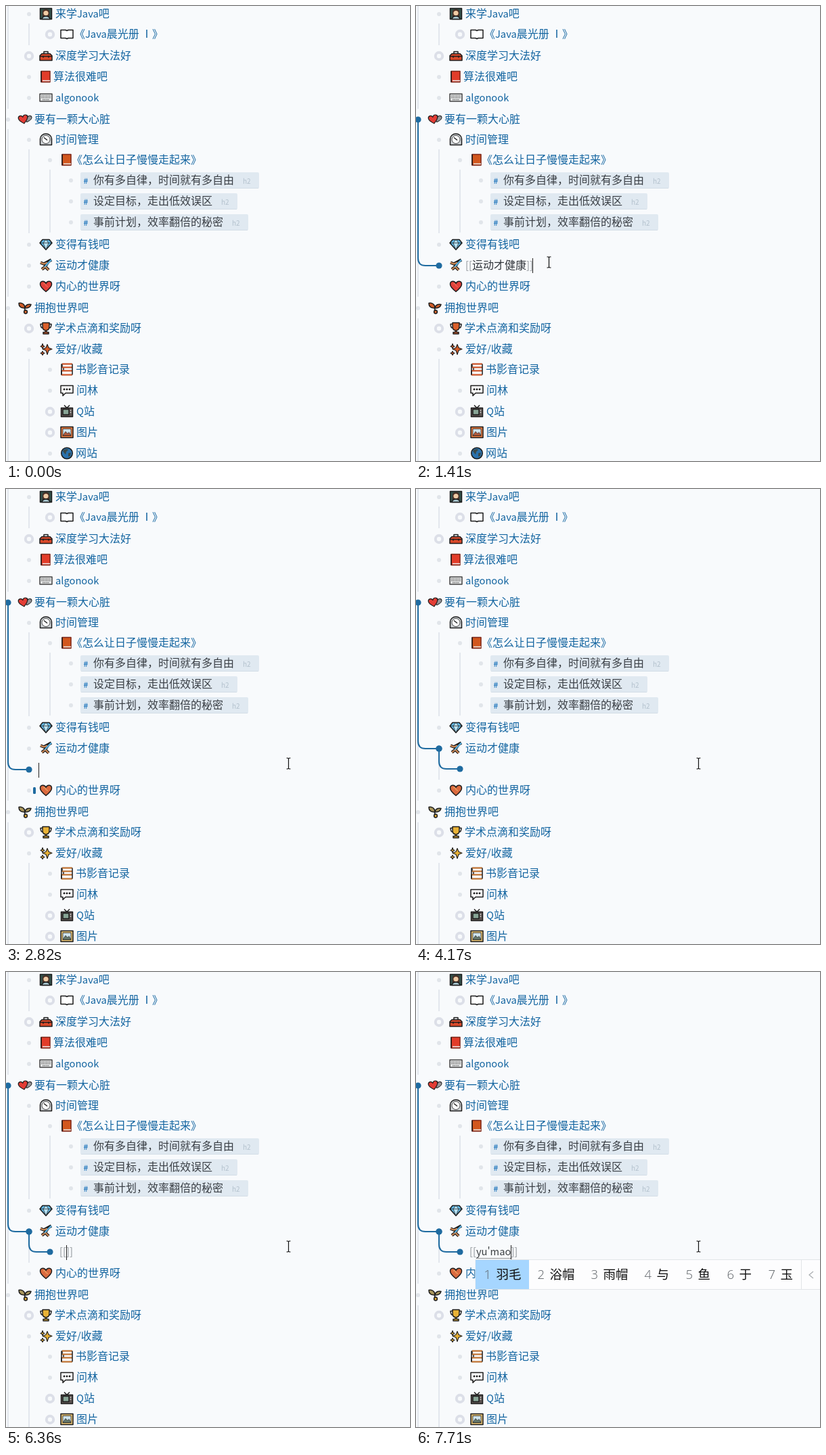
Write an HTML page that moves like this. It is 597x673 px and loops after 8 s.

```html
<!DOCTYPE html>
<html lang="zh-CN">
<head>
<meta charset="utf-8">
<title>Outline</title>
<style>
html, body { margin: 0; width: 100%; height: 100%; overflow: hidden; background: #f8fafc; }
svg { display: block; font-family: "Noto Sans CJK SC", "Noto Sans CJK", "Noto Sans CJK JP", sans-serif; font-weight: 350; }
text { white-space: pre; }
</style>
</head>
<body>
<svg id="stage" width="597" height="673" viewBox="0 0 597 673"></svg>
<script>
const LOOP = 8000, LINK = '#1264a0', BLUE = '#1f6ba0', PALE = '#e3e7ed', BG = '#f8fafc', FAINT = '#8c9196';
const LATIN = 14.7; // Latin letters sit slightly smaller beside 16 px Chinese
const FONT = '"Noto Sans CJK SC", "Noto Sans CJK", "Noto Sans CJK JP", sans-serif';
const stage = document.getElementById('stage');
const pen = document.createElement('canvas').getContext('2d');

// y, level, icon, text, text shift, folded
const rows = [
  [11.5, 1, 'girl', '来学Java吧'],
  [41.5, 2, 'open', '《Java晨光册 Ⅰ》', -3, 1],
  [73.5, 1, 'kit', '深度学习大法好', 0, 1],
  [104.5, 1, 'red', '算法很难吧', -3],
  [135.5, 1, 'keys', 'algonook'],
  [167.5, 0, 'hearts', '要有一颗大心脏'],
  [197.5, 1, 'clock', '时间管理'],
  [227.5, 2, 'brown', '《怎么让日子慢慢走起来》', -7],
  [352.5, 1, 'gem', '变得有钱吧'],
  [383.5, 1, 'flip', '运动才健康'],
  [414.5, 1, 'heart', '内心的世界呀'],
  [446.5, 0, 'sprout', '拥抱世界吧'],
  [476.5, 1, 'cup', '学术点滴和奖励呀', -1, 1],
  [507.5, 1, 'spark', '爱好/收藏'],
  [537.5, 2, 'books', '书影音记录', -1],
  [568.5, 2, 'bubble', '问林'],
  [599.5, 2, 'tv', 'Q站', 0, 1],
  [630.5, 2, 'photo', '图片', 0, 1],
  [661.5, 2, 'globe', '网站', -1]
];
const heads = [[258, '你有多自律，时间就有多自由'], [289, '设定目标，走出低效误区'], [320, '事前计划，效率翻倍的秘密']];
const pages = ['New page: y', 'oldKey', 'angery', 'cherry', 'safetyPin', 'motorCycle'];

// time, before, composing, after, candidates
const typing = [
  [0, '', '', '', ''],
  [4900, '', 'y', '', '有 一 要 也 与 用 以'],
  [5300, '', '', '', ''],
  [6030, '[', '', '', ''],
  [6360, '[[', '', ']]', ''],
  [6910, '[[', 'y', ']]', '有 一 要 也 与 用 以'],
  [7180, '[[', 'yu', ']]', '与 鱼 于 玉 雨 语 余'],
  [7450, '[[', "yu'm", ']]', '羽毛 玉门 渔民 与 鱼 于 玉'],
  [7580, '[[', "yu'ma", ']]', '御马 驭马 遇马 与 鱼 于 玉'],
  [7710, '[[', "yu'mao", ']]', '羽毛 浴帽 雨帽 与 鱼 于 玉']
];
const blinkOff = [[1890, 2420], [3380, 3650], [4170, 4700], [5830, 6030]];

const HEART = 'M0 8C-5 4-8.5 1-8.5-3C-8.5-8-2-9 0-4C2-9 8.5-8 8.5-3C8.5 1 5 4 0 8Z';
const path = (d, fill = 'none', more = '') => `<path d="${d}" fill="${fill}" ${more}/>`;
const rect = (x, y, w, h, fill, more = '') => `<rect x="${x}" y="${y}" width="${w}" height="${h}" fill="${fill}" ${more}/>`;
const dot = (x, y, r, fill, more = '') => `<circle cx="${x}" cy="${y}" r="${r}" fill="${fill}" ${more}/>`;
const text = (x, mid, s, fill, size = 16, more = '') =>
  `<text x="${x}" y="${Math.floor(mid + size * .375)}" fill="${fill}" font-size="${size}" ${more}>${s}</text>`;
const latin = (s, fill) => `<tspan font-size="${LATIN}" fill="${fill}">${s}</tspan>`;
const mixed = (s, fill) => s.replace(/[ -~]+/g, part => latin(part, fill));
const width = (s, size = LATIN) => (pen.font = `350 ${size}px ${FONT}`, pen.measureText(s).width);
const within = (t, [a, b]) => t >= a && t < b;
const bulletX = level => 3 + 31 * level;

const book = c => path('M-7-8H6V8H-7Z', c, 'stroke="#7d2416"') + path('M-5 6H6', 'none', 'stroke="#eee"') + path('M-7-8V8');
const icons = {
  girl: () => rect(-8.5, -8, 17, 16, '#35504a') + path('M-5 4V-3C-5-8 5-8 5-3V4Z', '#4a3026', 'stroke="none"') +
    dot(0, -1, 3.6, '#f0cba4', 'stroke="none"') + path('M-6 8C-5 2 5 2 6 8Z', '#a9c6cf'),
  open: () => path('M-9-6H-2L0-5L2-6H9V6H2L0 7L-2 6H-9Z', '#fff'),
  kit: () => path('M-3-2V-6H3V-2') + path('M-9 7V0L-6-3H6L9 0V7Z', '#db4a2b') + path('M-9 1H9M-4 0V3M4 0V3'),
  red: () => book('#e23c2a'),
  brown: () => book('#d2581f'),
  keys: () => rect(-9, -5.5, 18, 11, '#e4e6e6', 'stroke="#444"') +
    path('M-7-2.5H7M-7 0H7M-5 3H5', 'none', 'stroke="#777" stroke-dasharray="1.6 .8"'),
  hearts: () => path(HEART, '#96969a', 'transform="translate(4 -1) rotate(12) scale(.66)"') +
    path(HEART, '#e33d35', 'transform="translate(-2.5 0) rotate(-12) scale(.8)"'),
  clock: () => path('M-8.5 8V-1A8.5 7.5 0 0 1 8.5-1V8Z', '#cfd3d6') + dot(0, 0, 6, '#fff', 'stroke-width=".8"') + path('M2 1L-3-3'),
  gem: () => path('M-5-7H5L9-2L0 8L-9-2Z', '#62b6e2') + path('M-9-2H9M-4-2L0 8L4-2L0-7Z', '#b9e2f4', 'stroke-width=".7"'),
  flip: () => path('M-8-4L-3-2L8-8M4-6L-2 3L-6 6M-1 2L4 7', 'none', 'stroke-width="4.5"') +
    path('M-8-4L-3-2L2-4', 'none', 'stroke="#d58d58" stroke-width="2"') + path('M8-8L1-1L-2 3', 'none', 'stroke="#58aede" stroke-width="2.4"') +
    path('M-2 3L-6 6M-1 2L4 7', 'none', 'stroke="#d58d58" stroke-width="2"'),
  heart: late => path(HEART, late ? '#db6a3e' : '#e2413a') + path('M-4-3C-3-5-1-4 0-1L3 1', 'none', late ? 'stroke="#e9a060"' : 'stroke="#ea6a55"'),
  sprout: late => path('M0 0C-1 3 0 4 1 5') + path('M0 0C-8 1-9-4-9-7C-4-8 0-5 0 0C1-5 5-6 9-5C8-1 4 1 0 0Z', late ? '#a9965c' : '#cf5c28') +
    dot(1, 6, 2.4, late ? '#e5ac38' : '#dd6a30'),
  cup: late => path('M-5-6H-8C-8-2-6 0-4 0M5-6H8C8-2 6 0 4 0') +
    path('M-5-8H5V-3C5 1 3 3 1 3V6H4V8.5H-4V6H-1V3C-3 3-5 1-5-3Z', warm(late)),
  spark: late => path('M2-7L4-2L9 0L4 2L2 8L0 2L-5 0L0-2ZM-5-8L-4-5L-2-4L-4-3L-5-1L-6-3L-8-4L-6-5ZM-5 3L-4 5L-2 6L-4 7L-5 9L-6 7L-8 6L-6 5Z', warm(late), 'stroke-width="1.1"'),
  books: late => path('M7-8H-7V-3H7M8-3H-5V2H8M7 2H-8V8H7', '#fff') + path('M8-8H-7M8-3H-7M8 2H-8M8 8H-8', 'none', `stroke="${late ? '#cf7a34' : '#dc5a2c'}" stroke-width="2.2"`) +
    path('M-8-8V8M8-8V8'),
  bubble: () => path('M-9-7H9V4H-2L-6 8V4H-9Z', '#fff') + [-4, 0, 4].map(x => dot(x, -1.5, .7, '#222')).join(''),
  tv: () => path('M-4-9L0-5L4-9') + rect(-8.5, -5, 17, 13, '#5d5452') + rect(-6, -3, 9, 8, '#88a596') + path('M5.5-2V4', 'none', 'stroke="#ddd" stroke-dasharray="1.5 1.5"'),
  photo: late => rect(-9, -8, 18, 16, late ? '#d7b56c' : '#e0763c') + rect(-6, -5, 12, 10, '#cfe3ec', 'stroke-width=".7"') +
    path('M-6 5L-2-1L1 2L3 0L6 5Z', late ? '#66796c' : '#b45a3c', 'stroke-width=".7"'),
  globe: () => dot(0, 0, 8.3, '#2b72ad') + path('M-6-3C-4-7 1-7 2-5L-1-2L-2 2ZM2 0L6-1L5 4L2 5Z', '#3c4a48', 'stroke="none"')
};
function warm(late) { return late ? '#e9b236' : '#da5f2a'; }

function bullet(x, y, folded) {
  return folded ? dot(x, y, 5.2, BG, 'stroke="#dcdfe8" stroke-width="4"') : dot(x, y, 3, '#e1e5ea');
}

function row([y, level, icon, label, dx = 0, folded], late, editing) {
  const x = bulletX(level);
  const title = editing
    ? text(x + 39, y, mixed(`[[${label}]]`, FAINT), '#30343a')
    : text(x + 39 + dx, y, mixed(label, LINK), LINK);
  return bullet(x, y + .5, folded) +
    `<g transform="translate(${x + 25} ${y})" stroke="#1c1c1c" stroke-width="1.5" stroke-linejoin="round">${icons[icon](late)}</g>` + title;
}

function head([y, label]) {
  const end = 129 + label.length * 16;
  return bullet(96, y) + rect(110, y - 12, end - 73, 24, '#e0e9f1', 'rx="2"') + path(`M111 ${y + 11.5}H${end + 36}`, 'none', 'stroke="#d3dde6"') +
    text(114.5, y + 1, '#', '#2f7fc0', 11.5, 'font-weight="bold"') + text(129, y - .5, label, '#3a3f45') +
    text(end + 13, y + 2, 'h2', '#b3c1cd', 10);
}

const guide = (x, a, b) => rect(x - 1, a, 2, b - a, PALE);
const branch = (x, a, b) =>
  path(`M${x} ${a}V${b - 11}Q${x} ${b} ${x + 11} ${b}H${x + 31}`, 'none', `stroke="${BLUE}" stroke-width="2"`) +
  dot(x, a, 4.6, BLUE) + dot(x + 31, b, 4.6, BLUE);
const caret = (x, y) => rect(x, y, 1, 22, '#222');

// The pointer advances in 70 ms ticks.
function pointer(t) {
  const ease = (start, n) => {
    const p = Math.min(1, Math.max(0, (Math.floor((t - start) / 70) + 1) / n));
    return p * p * (3 - 2 * p);
  };
  if (t < 220) return null;
  if (t < 1060) {
    const p = ease(150, 13);
    return [545 - 345 * p, 668 - 285 * p];
  }
  if (t < 1480) {
    const p = ease(1060, 4);
    return [200 - 4 * p, 383 - 4 * p - 4 * Math.sin(Math.PI * p)];
  }
  const p = ease(1480, 8);
  return [196 + 221 * p, 379.5 + 26.5 * p + 5 * Math.sin(Math.PI * p)];
}

function hoverArrow(p) {
  const hit = rows.find(r => Math.abs(r[0] - p[1]) < 15.5);
  if (!hit || !(hit[5] || hit[2] === 'spark')) return '';
  const turn = hit[5] ? 0 : 90;
  return path('M-2.5-4L3 0L-2.5 4Z', '#a3abb5', `transform="translate(${bulletX(hit[1]) - 20} ${hit[0]}) rotate(${turn})"`);
}

function ime(x, words) {
  let out = rect(x, 425.5, 620 - x, 44, '#fdfdfe', 'stroke="#e2e5e8"'), left = x;
  words.split(' ').forEach((word, i) => {
    const w = 43 + 18 * word.length;
    if (!i) out += rect(left, 426, w, 43, '#a6d6ff');
    out += text(left + 12.5, 447.5, i + 1, '#5c6166', 18.5, 'font-family="Open Sans, sans-serif"') + text(left + 30.5, 447.5, word, '#111', 18.5);
    left += w;
  });
  return out + path(`M${left + .5} 426V469M${left + 65.5} 426V469`, 'none', 'stroke="#e2e5e8"') +
    path(`M${left + 18} 443L${left + 12} 448L${left + 18} 453`, 'none', 'stroke="#a9adb1" stroke-width="1.2"') +
    path(`M${left + 48} 442L${left + 54} 448L${left + 48} 454`, 'none', 'stroke="#222" stroke-width="1.3"');
}

function pageList() {
  let out = rect(88.5, 426.5, 301, 260, BG, 'stroke="#e9edf0"') + rect(383, 470, 6, 178, '#d3d5d7');
  pages.forEach((name, i) => {
    const y = 480.5 + 36 * i, at = name.lastIndexOf('y');
    out += rect(105 + width(name.slice(0, at), 13), y + 4, 7, 4, '#eeb83e') + text(105, y, name, '#3c4043', 13);
  });
  return out;
}

function scene(t) {
  const late = t >= 2820, nested = t >= 3650, editing = t >= 1410 && !late;
  const shift = late ? 31 : 0;
  const visible = !blinkOff.some(span => within(t, span));
  let out = guide(3, 0, 152) + guide(3, 182, 430 + shift) + guide(3, 462 + shift, 673) + guide(34, 26, 58) +
    guide(34, 212, 336) + guide(65, 242, 335) + guide(34, 522 + shift, 673);
  if (nested) out += guide(34, 398, 430);
  for (const r of rows) {
    const y = r[0] > 400 ? r[0] + shift : r[0];
    out += row([y, ...r.slice(1)], late, editing && r[2] === 'flip');
  }
  out += heads.map(head).join('');

  if (t >= 1410) out += branch(3, 168, late && !nested ? 415 : 384);
  if (nested) out += branch(34, 384, 414);
  if (within(t, [2820, 2890])) out += rect(40, 441, 4, 10, BLUE, 'rx="1.5"');

  if (editing && visible) out += caret(172, 373);
  if (late && !nested && visible) out += caret(48, 405);
  if (nested) {
    const [, pre, comp, post, words] = typing.filter(s => s[0] <= t).pop();
    const a = 79 + width(pre), b = a + width(comp);
    out += text(79, 414, latin(pre, FAINT) + latin(comp, '#3c4043') + latin(post, FAINT), FAINT, LATIN);
    if (comp) out += path(`M${a} 423.5H${b}`, 'none', 'stroke="#333" stroke-dasharray="1 1"');
    if (visible) out += caret(Math.round(b), 404);
    if (within(t, [6440, 6980])) out += rect(88.5, 426.5, 285, 58, BG, 'stroke="#e5e9ed"') + text(105, 455, 'Search for a page', '#6b7278', 13);
    if (within(t, [6980, 7180])) out += pageList();
    if (words) out += ime(Math.floor(a), words);
  }

  const p = pointer(t);
  if (p) {
    if (t < 1060) out += hoverArrow(p);
    out += path('M-3-8H-1L0-7L1-8H3M0-7V7M-3 8H-1L0 7L1 8H3', 'none',
      `stroke="#111" stroke-width="1.2" transform="translate(${Math.round(p[0]) + .5} ${Math.round(p[1])})"`);
  }
  return out;
}

let shown = '';
const begin = performance.now();
function update() {
  const next = scene((performance.now() - begin) % LOOP);
  if (next !== shown) stage.innerHTML = shown = next;
  requestAnimationFrame(update);
}
update();
</script>
</body>
</html>
```
